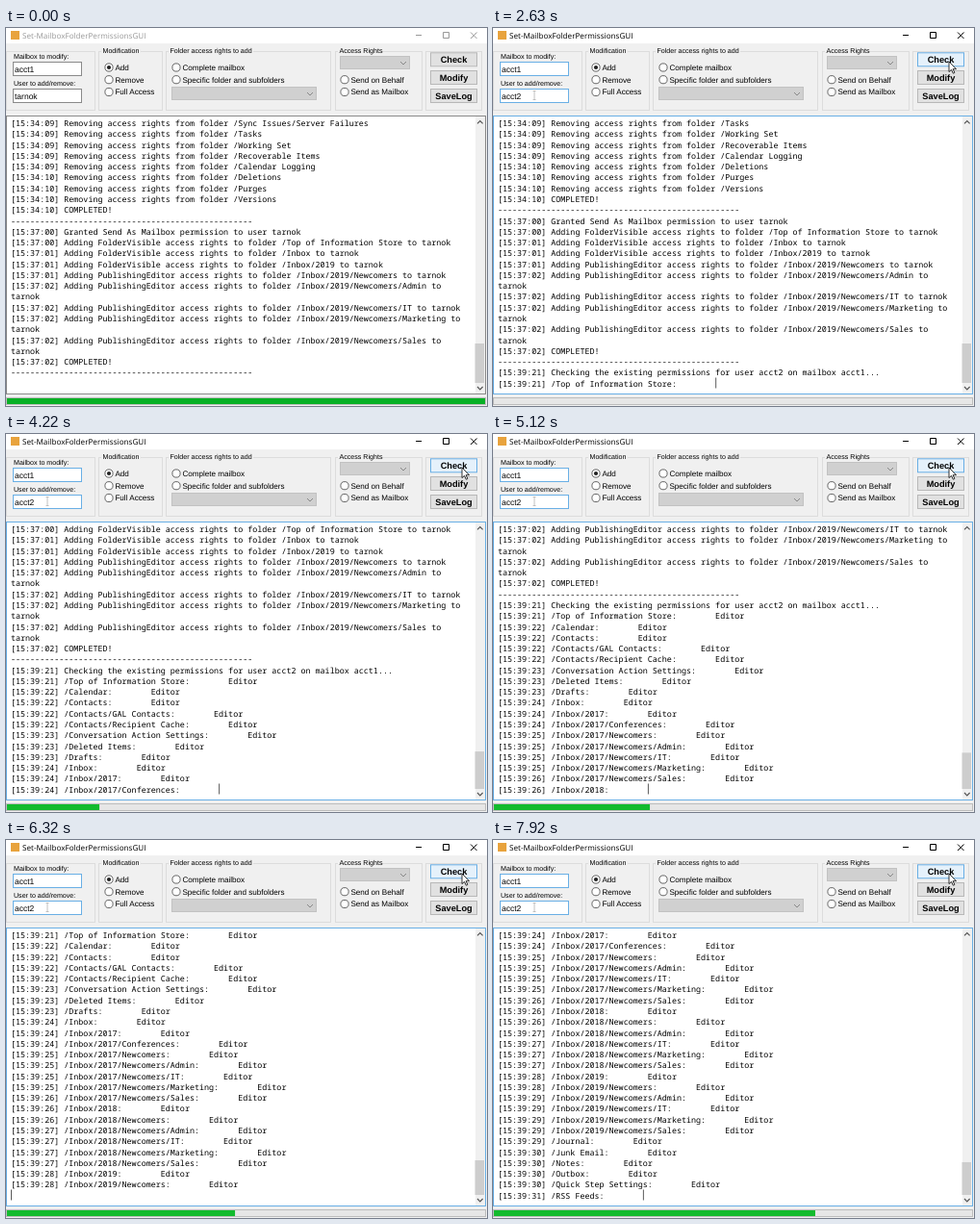
These frames come from a looping animation (500 px wide and 393 px high, 8 s). An HTML page:

```html
<!DOCTYPE html>
<html lang="en">
<head>
<meta charset="utf-8">
<title>Folder permissions tool</title>
<style>
  html, body { margin: 0; width: 100%; height: 100%; overflow: hidden; background: #f0f0f0; }
  svg { display: block; width: 500px; height: 393px; }
  text { white-space: pre; text-rendering: geometricPrecision; font-family: "Liberation Sans", Arial, sans-serif; }
  .caption { font-size: 7.1px; }
  .option { font-size: 8.1px; }
  .field { font-size: 8.5px; }
  .button { font-size: 9.2px; font-weight: bold; text-anchor: middle; }
  #title { font-family: "Open Sans", "Noto Sans", sans-serif; font-size: 8.15px; }
  #log text { font-family: "Noto Sans Mono", "DejaVu Sans Mono", monospace; font-size: 8.38px; }
</style>
</head>
<body>
<svg id="stage" viewBox="0 0 500 393"></svg>
<script>
const LOOP = 8000, ROWS = 25, COL = 5.03, ROW = 11.27;
const BLUE = '#0078d7', SOFT_BLUE = '#69afe5', GRAY = '#8a8a8a';
const OWNER = 'acct1', OLD_NAME = 'tarnok', NEW_NAME = 'acct2';

// ---------- static window ----------
const rect = (x, y, w, h, fill, stroke = 'none', extra = '') =>
  `<rect x="${x}" y="${y}" width="${w}" height="${h}" fill="${fill}" stroke="${stroke}" ${extra}/>`;
const label = (x, y, cls, s, extra = '') => `<text x="${x}" y="${y}" class="${cls}" ${extra}>${s}</text>`;
const line = (d, color, extra = '') => `<path d="${d}" fill="none" stroke="${color}" ${extra}/>`;

const group = (x, w, caption = '', capWidth = 0) =>
  rect(x + .5, 24.5, w, 61, 'none', '#dcdcdc') +
  (caption ? rect(x + 3, 21, capWidth, 7, '#f0f0f0') + label(x + 4.5, 26, 'caption', caption) : '');

const radio = (x, y, s, on) =>
  `<circle cx="${x}" cy="${y}" r="4.1" fill="#fff" stroke="#444" stroke-width=".8"/>` +
  (on ? `<circle cx="${x}" cy="${y}" r="2.1" fill="#222"/>` : '') +
  label(x + 6.4, y + 2.9, 'option', s);

const combo = (x, y, w) => rect(x + .5, y + .5, w, 13, '#d0d0d0', '#c2c2c2') +
  line(`M${x + w - 9} ${y + 6}l3 3l3-3`, '#888');

const button = (y, s, id = '') =>
  rect(441.5, y + .5, 48, 14, '#e1e1e1', '#b8b8b8', `id="${id}"`) + label(465.5, y + 10.7, 'button', s);

document.getElementById('stage').innerHTML =
  rect(0, 0, 500, 393, '#f0f0f0') + rect(0, 0, 500, 16, '#fff') +
  rect(5, 3, 9, 9, '#e8a33d') +
  '<text id="title" x="17" y="10.5">Set-MailboxFolderPermissionsGUI</text>' +
  '<g id="controls" fill="none"><path d="M426 7.5h6M454.5 4.5h6v6h-6zM483 4.5l6.5 6.5M489.5 4.5l-6.5 6.5"/></g>' +
  group(0, 92) + group(96, 66, 'Modification', 41) + group(166, 171, 'Folder access rights to add', 88) +
  group(342, 90, 'Access Rights', 46) + group(436, 58) +
  label(8, 31.6, 'caption', 'Mailbox to modify:') +
  label(8, 59.6, 'caption', 'User to add/remove:') +
  rect(7.5, 35.5, 71, 14, '#fff', GRAY, 'id="ownerBox"') + label(9, 45.6, 'field', OWNER) +
  rect(7.5, 63.5, 71, 14, '#fff', GRAY, 'id="nameBox"') +
  rect(9, 65, 27, 11, BLUE, 'none', 'id="selection"') +
  label(9, 73.6, 'field', '', 'id="name"') +
  radio(107, 41, 'Add', true) + radio(107, 53.7, 'Remove') + radio(107, 66.5, 'Full Access') +
  radio(177, 41, 'Complete mailbox') + radio(177, 53.7, 'Specific folder and subfolders') +
  radio(352, 53.7, 'Send on Behalf') + radio(352, 66.5, 'Send as Mailbox') +
  combo(172, 61, 150) + combo(347, 29, 72) +
  button(25.3, 'Check', 'check') + button(44, 'Modify') + button(63, 'SaveLog') +
  rect(.5, 91.5, 498, 289, '#fff', GRAY, 'id="frame"') +
  rect(488, 92, 10, 288, '#f0f0f0') + rect(487.5, 328, 9.5, 41, '#cdcdcd', 'none', 'id="thumb"') +
  line('M490 99.3l2.8-2.8l2.8 2.8M490 373l2.8 2.8l2.8-2.8', '#555', 'stroke-width="1.2"') +
  '<g id="log">' + Array.from({length: ROWS}, (_, i) => `<text x="5" y="${102.1 + i * ROW}"></text>`).join('') + '</g>' +
  rect(0, 363.5, .8, 11, '#333', 'none', 'id="caret"') +
  rect(.5, 384.5, 498, 7, '#e6e6e6', '#bcbcbc') + rect(1, 385, 497, 6, '#06b025', 'none', 'id="bar"') +
  '<path id="beam" d="M-1.5-4.5h3M0-4.5v9M-1.5 4.5h3" stroke="#000" stroke-width=".8"/>' +
  '<path id="arrow" d="M0 0v10.6l2.5-2.3l1.8 3.9l1.6-.7l-1.8-3.8h3.4z" fill="#fff" stroke="#000" stroke-width=".8"/>';

const $ = id => document.getElementById(id);
const set = (id, attrs) => { for (const k in attrs) $(id).setAttribute(k, attrs[k]); };
const show = (id, on) => set(id, {visibility: on ? 'visible' : 'hidden'});
const rows = [...$('log').children];

// ---------- log content ----------
const stamp = (time, s) => `[15:${time}] ${s}`;
const removed = ['Sync Issues/Server Failures', 'Tasks', 'Working Set', 'Recoverable Items',
  'Calendar Logging', 'Deletions', 'Purges', 'Versions'];
const added = (time, role, path) => stamp(time, `Adding ${role} access rights to folder /${path} to`);
const dashes = '-'.repeat(50);
const history = [
  ...removed.map((s, i) => stamp(i < 5 ? '34:09' : '34:10', `Removing access rights from folder /${s}`)),
  stamp('34:10', 'COMPLETED!'), dashes,
  stamp('37:00', `Granted Send As Mailbox permission to user ${OLD_NAME}`),
  added('37:00', 'FolderVisible', 'Top of Information Store') + ' ' + OLD_NAME,
  added('37:01', 'FolderVisible', 'Inbox') + ' ' + OLD_NAME,
  added('37:01', 'FolderVisible', 'Inbox/2019') + ' ' + OLD_NAME,
  added('37:01', 'PublishingEditor', 'Inbox/2019/Newcomers') + ' ' + OLD_NAME,
  added('37:02', 'PublishingEditor', 'Inbox/2019/Newcomers/Admin'), OLD_NAME,
  added('37:02', 'PublishingEditor', 'Inbox/2019/Newcomers/IT') + ' ' + OLD_NAME,
  added('37:02', 'PublishingEditor', 'Inbox/2019/Newcomers/Marketing'), OLD_NAME,
  added('37:02', 'PublishingEditor', 'Inbox/2019/Newcomers/Sales'), OLD_NAME,
  stamp('37:02', 'COMPLETED!'), dashes
];

const year = y => ['', '/Newcomers', '/Newcomers/Admin', '/Newcomers/IT', '/Newcomers/Marketing', '/Newcomers/Sales']
  .map(s => `Inbox/${y}${s}`);
const y2017 = year(2017);
const folders = ['Top of Information Store', 'Calendar', 'Contacts', 'Contacts/GAL Contacts',
  'Contacts/Recipient Cache', 'Conversation Action Settings', 'Deleted Items', 'Drafts', 'Inbox',
  y2017[0], 'Inbox/2017/Conferences', ...y2017.slice(1), ...year(2018), ...year(2019),
  'Journal', 'Junk Email', 'Notes', 'Outbox', 'Quick Step Settings', 'RSS Feeds'];
// index of the first folder stamped with each second from 22 on
const newSecond = [1, 5, 8, 11, 15, 18, 22, 24, 29, 33];
const checks = folders.map((f, i) =>
  stamp(`39:${21 + newSecond.filter(n => n <= i).length}`, `/${f}:        `));

// ---------- motion ----------
const lerp = (points, t, col = 1) => {
  if (t <= points[0][0]) return points[0][col];
  for (let i = 1; i < points.length; i++) {
    const a = points[i - 1], b = points[i];
    if (t <= b[0]) return a[col] + (b[col] - a[col]) * (t - a[0]) / (b[0] - a[0]);
  }
  return points[points.length - 1][col];
};
const folderStarts = [[0, 2600], [6, 3580], [10, 4185], [16, 5090], [24, 6360], [33, 7895], [34, 8070]];
const progress = [[2700, 0], [3610, 53], [4220, 96], [5120, 162], [6320, 237], [7920, 334]];
const pointer = [[70, 150, 280], [250, 84, 130], [430, 43, 70], [1340, 43, 70], [1520, 240, 44],
  [1700, 437, 22], [1940, 474, 35]];
const TYPE_START = 1000, TYPE_STEP = 76, CLICK = 2100, CHECKING = 2250;

function logLines(t) {
  const lines = [...history];
  if (t >= CHECKING)
    lines.push(stamp('39:21', `Checking the existing permissions for user ${NEW_NAME} on mailbox ${OWNER}...`));
  let last = '';
  for (let i = 0; i < checks.length; i++) {
    const start = lerp(folderStarts, i), end = lerp(folderStarts, i + 1);
    if (t < start) break;
    if (t < start + (end - start) * .65) { last = checks[i]; break; }
    lines.push(checks[i] + 'Editor');
  }
  return [...lines, last];
}

function draw(t) {
  const active = t >= 70, inField = t >= 440 && t < CLICK, x = lerp(pointer, t), y = lerp(pointer, t, 2);
  const overField = x < 78 && y > 63 && y < 78;
  const overCheck = x > 441 && y > 25 && y < 40;

  set('title', {fill: active ? '#000' : '#999'});
  set('controls', {stroke: active ? '#000' : '#999'});

  const selected = t >= 690 && t < 930;
  const typed = Math.max(0, Math.floor((t - TYPE_START) / TYPE_STEP) + 1);
  $('name').textContent = t < 930 ? OLD_NAME : NEW_NAME.slice(0, typed);
  set('name', {fill: selected ? '#fff' : '#000'});
  show('selection', selected);
  set('ownerBox', {stroke: active ? SOFT_BLUE : GRAY});
  set('nameBox', {stroke: inField ? BLUE : active ? SOFT_BLUE : GRAY});

  set('check', {fill: overCheck ? (t >= CLICK && t < CLICK + 150 ? '#cce4f7' : '#e5f1fb') : '#e1e1e1',
    stroke: overCheck ? SOFT_BLUE : '#b8b8b8'});
  set('frame', {stroke: active && !inField ? SOFT_BLUE : GRAY});

  const lines = logLines(t), visible = lines.slice(-ROWS);
  rows.forEach((row, i) => { if (row.textContent !== visible[i]) row.textContent = visible[i]; });
  const top = 328 + Math.max(0, lines.length - 26) * .21;
  set('thumb', {y: top, height: 369 - top});
  set('caret', {x: 5 + visible[ROWS - 1].length * COL});
  show('caret', t >= CHECKING);
  set('bar', {width: t < CHECKING ? 497 : lerp(progress, t), fill: t < CHECKING ? '#06b025' : '#12bb2e'});

  set('arrow', {transform: `translate(${x} ${y})`});
  show('arrow', active && !overField);
  // the text cursor leaves a faint trace in the field
  const typing = t >= TYPE_START;
  set('beam', {transform: typing ? 'translate(43 70)' : `translate(${x} ${y})`, opacity: typing ? .3 : 1});
  show('beam', typing || active && overField);
}

const began = performance.now();
function tick() {
  draw((performance.now() - began) % LOOP);
  requestAnimationFrame(tick);
}
draw(0);
requestAnimationFrame(tick);
</script>
</body>
</html>
```
